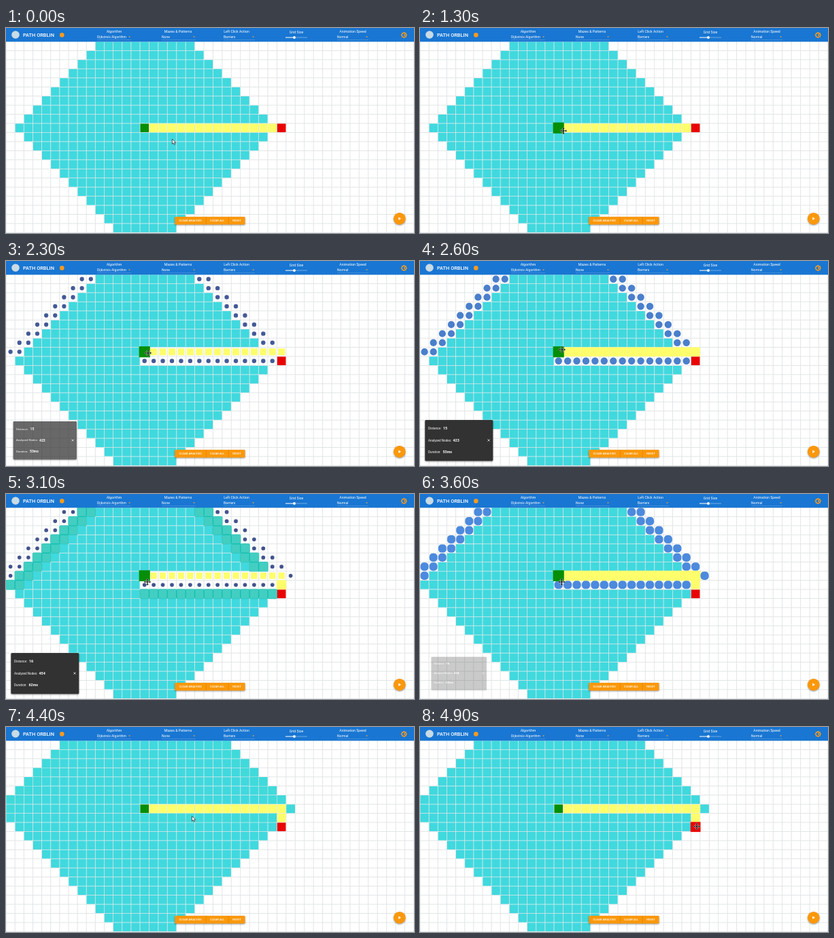
An HTML page with a canvas for the animation above (5 s loop, 600x303 px).

```html
<!DOCTYPE html>
<html lang="en">
<head>
<meta charset="utf-8">
<title>Path finder</title>
<style>
  html, body { margin: 0; width: 600px; height: 303px; overflow: hidden; background: #fff; }
  canvas, svg { position: absolute; left: 0; top: 0; }
  svg { font-family: Roboto, "Open Sans", sans-serif; fill: #fff; }
  .label { font-size: 5.2px; text-anchor: middle; }
  .value { font-size: 5px; }
  .button { font-size: 4.1px; font-weight: 500; text-anchor: middle; letter-spacing: .1px; }
  .info { font-size: 4.6px; }
  .info .num { font-size: 5.4px; font-weight: 700; }
  .shadow { filter: drop-shadow(0 1px 1px #0006); }
</style>
</head>
<body>
<canvas id="grid" width="600" height="303"></canvas>
<svg width="600" height="303" viewBox="0 0 600 303">
  <rect width="600" height="20.3" fill="#1976d2"/>
  <circle cx="14" cy="10" r="5.8" fill="#c9dbe4"/>
  <text x="25" y="13" font-size="7.4" font-weight="500">PATH ORBLIN</text>
  <circle cx="82.3" cy="10.4" r="3.3" fill="#f79a1d"/>
  <g id="menus"></g>
  <text class="label" x="427" y="7.6">Grid Size</text>
  <path d="M411 14H443" stroke="#8fbce8" stroke-width=".8"/>
  <path d="M411 14H424" stroke="#fff" stroke-width=".8"/>
  <circle cx="424" cy="14" r="1.9"/>
  <g transform="translate(585.3 10.4)" fill="#f79a1d">
    <rect x="-3.4" y="-3.4" width="6.8" height="6.8"/>
    <rect x="-3.4" y="-3.4" width="6.8" height="6.8" transform="rotate(45)"/>
    <circle r="2.5" fill="#1976d2"/>
    <path d="M0-1.8A1.8 1.8 0 0 1 0 1.8Z"/>
  </g>
  <g id="panel">
    <rect class="shadow" x="7.3" y="235" width="100" height="60.5" rx="1.5" fill="#323232"/>
    <g class="info">
      <text x="12" y="249">Distance:</text><text class="num" x="34" y="249.2"></text>
      <text x="12" y="266.5">Analyzed Nodes:</text><text class="num" x="48.5" y="266.8"></text>
      <text x="12" y="283.8">Duration:</text><text class="num" x="33.5" y="284"></text>
    </g>
    <path d="M99.4 263.4l3.2 3.2m0-3.2l-3.2 3.2" stroke="#fff" stroke-width=".7"/>
  </g>
  <g class="shadow">
    <rect x="248.3" y="279" width="103.2" height="11.6" rx="1.3" fill="#fb980b"/>
    <path d="M294.3 279v11.6M327.3 279v11.6" stroke="#c97a0c" stroke-width=".5"/>
  </g>
  <text class="button" x="271.2" y="286.3">CLEAR ANALYSIS</text>
  <text class="button" x="310.7" y="286.3">CLEAR ALL</text>
  <text class="button" x="339.6" y="286.3">RESET</text>
  <circle class="shadow" cx="578.8" cy="281.8" r="8.9" fill="#fb980b"/>
  <path d="M577.3 279.5v4.6l3.7-2.3z"/>
  <g id="cursor" stroke-linejoin="round">
    <path id="arrow" d="M-1.6-4v7.4l1.7-1.5 1.2 2.7 1.3-.6-1.2-2.6h2.3z" stroke="#333" stroke-width=".8"/>
    <path id="move" fill="#111" stroke="#fff" stroke-width=".8" paint-order="stroke"/>
  </g>
</svg>
<script>
const LOOP = 5000, STEP = 100, GROW = 1500;
const SEARCH = [-GROW, 2135, 2980];            // when each search begins
const MOVED = [1950, 2900];                    // when the start node goes up a row
const RESULTS = [[15, 423, "53ms"], [16, 454, "62ms"]];
const CURSOR = [[0, 246, 168], [600, 246, 168], [1200, 211, 152], [1700, 211, 152], [2000, 209, 141],
  [2600, 209, 131], [3100, 208, 130], [4200, 209, 130], [4800, 407, 147], [5000, 407, 147]];
const $ = id => document.getElementById(id);
const ctx = $("grid").getContext("2d");
const nums = document.querySelectorAll(".num");

const MENUS = [["Algorithm", 159, "Dijkstra's Algorithm", 134], ["Mazes & Patterns", 253, "None", 229],
  ["Left Click Action", 339, "Barriers", 320], ["Animation Speed", 510, "Normal", 487]];
$("menus").innerHTML = MENUS.map(([label, mid, value, x]) => {
  const end = x + (x < 300 ? 50 : 46);
  return `<text class="label" x="${mid}" y="7.2">${label.replace("&", "&amp;")}</text>
    <text class="value" x="${x}" y="14.8">${value}</text>
    <path d="M${x} 17.6H${end}" stroke="#6ba6e0" stroke-width=".5"/>
    <path d="M${end - 4} 12.4h3.2l-1.6 1.7z" fill="#f0a347"/>`;
}).join("");

const side = "L-1.8-3.2H-.6V-.6";
$("move").setAttribute("d", "M0-5L1.8-3.2H.6V-.6H3.2V-1.8L5 0 3.2 1.8V.6H.6V3.2H1.8L0 5-1.8 3.2H-.6V.6H-3.2V1.8L-5 0-3.2-1.8V-.6H-.6V-3.2H-1.8Z");

const colX = c => 197 + c * (c < 0 ? 13.13 : 13.43);
const rowY = r => 141 + r * 13.45;
const mix = (a, b, k) => a + (b - a) * k;

// cubic-bezier(0, 0, .58, 1)
function easeOut(x) {
  let lo = 0, hi = 1;
  for (let i = 0; i < 18; i++) {
    const u = (lo + hi) / 2;
    if (1.74 * u * u * (1 - u) + u ** 3 < x) lo = u; else hi = u;
  }
  return 3 * lo * lo - 2 * lo ** 3;
}

// Value at p between [position, value] stops, easing each stretch
function along(stops, p) {
  const i = Math.max(1, stops.findIndex(s => s[0] >= p));
  const [a, from] = stops[i - 1], [b, to] = stops[i];
  const k = easeOut((p - a) / (b - a));
  return Array.isArray(from) ? from.map((v, j) => mix(v, to[j], k)) : mix(from, to, k);
}
const VISIT_SIZE = [[0, .3], [.75, 1.2], [1, 1]];
const VISIT_COLOR = [[0, [0, 0, 66]], [.5, [17, 104, 217]], [.75, [0, 217, 159]], [1, [0, 204, 211]]];
const PATH_SIZE = [[0, .6], [.5, 1.2], [1, 1]];

// What a cell is after search n: "path", "visited" or ""
function kind(c, r, n) {
  if (r === -n && c > 0 && c < (n ? 16 : 15) || n === 2 && c === 15 && r === -1) return "path";
  if (c === 0 && r === -n || c === 15 && r === 0) return "";
  return Math.abs(c) + Math.abs(r + n) <= 14 + n ? "visited" : "";
}

function box(c, r, scale, color, round = 0) {
  const x0 = colX(c), y0 = rowY(r);
  const w = (colX(c + 1) - x0 - .8) * scale, h = 12.65 * scale;
  const x = (x0 + colX(c + 1) - w) / 2, y = y0 + (13.45 - h) / 2;
  ctx.fillStyle = color;
  ctx.beginPath();
  ctx.roundRect(x, y, w, h, Math.min(.5, round) * w);
  ctx.fill();
}

function drawCell(c, r, n, t) {
  const type = kind(c, r, n);
  if (!type) return;
  let first = n;
  while (first > 0 && kind(c, r, first - 1) === type) first--;
  const p = Math.min(1, (t - SEARCH[first]) / GROW);
  if (type === "path") return box(c, r, along(PATH_SIZE, p), "#fefe6c");
  const rgb = along(VISIT_COLOR, p).map(Math.round);
  box(c, r, along(VISIT_SIZE, p), `rgba(${rgb},.75)`, 1 - easeOut(p));
}

function drawGrid(t) {
  ctx.clearRect(0, 0, 600, 303);
  ctx.fillStyle = "#e1e5e7";
  for (let c = -15; c <= 30; c++) ctx.fillRect(colX(c) - .5, 20, 1, 283);
  for (let r = -9; r <= 12; r++) ctx.fillRect(0, rowY(r) - .5, 600, 1);
  const n = SEARCH.filter(s => t >= s).length - 1;
  for (let r = -9; r < 12; r++)
    for (let c = -15; c < 30; c++) drawCell(c, r, n, t);
  const row = -MOVED.filter(m => t >= m).length;
  box(0, row, t >= 1200 && t < 4300 ? 1.28 : 1, "#068e06");
  box(15, 0, t >= 4800 ? 1.17 : 1, "#e90303");
}

function drawPanel(t) {
  const shown = Math.min(1, Math.max(0, (t - SEARCH[1]) / 225), Math.max(0, (3650 - t) / 200));
  const s = .75 + .25 * shown;
  $("panel").setAttribute("opacity", shown);
  $("panel").setAttribute("transform", `translate(57 265) scale(${s}) translate(-57 -265)`);
  RESULTS[t < SEARCH[2] ? 0 : 1].forEach((v, i) => nums[i].textContent = v);
}

function drawCursor(t) {
  const i = CURSOR.findIndex(k => k[0] > t);
  const [a, x0, y0] = CURSOR[i - 1], [b, x1, y1] = CURSOR[i];
  const k = (t - a) / (b - a);
  $("cursor").setAttribute("transform", `translate(${mix(x0, x1, k)} ${mix(y0, y1, k)})`);
  const onNode = t >= 1200 && t < 4300 || t >= 4800;
  $("move").setAttribute("visibility", onNode ? "visible" : "hidden");
  $("arrow").setAttribute("visibility", onNode ? "hidden" : "visible");
}

const begin = performance.now();
function frame() {
  const t = Math.floor((performance.now() - begin) % LOOP / STEP) * STEP;
  drawGrid(t);
  drawPanel(t);
  drawCursor(t);
  requestAnimationFrame(frame);
}
frame();
</script>
</body>
</html>
```
